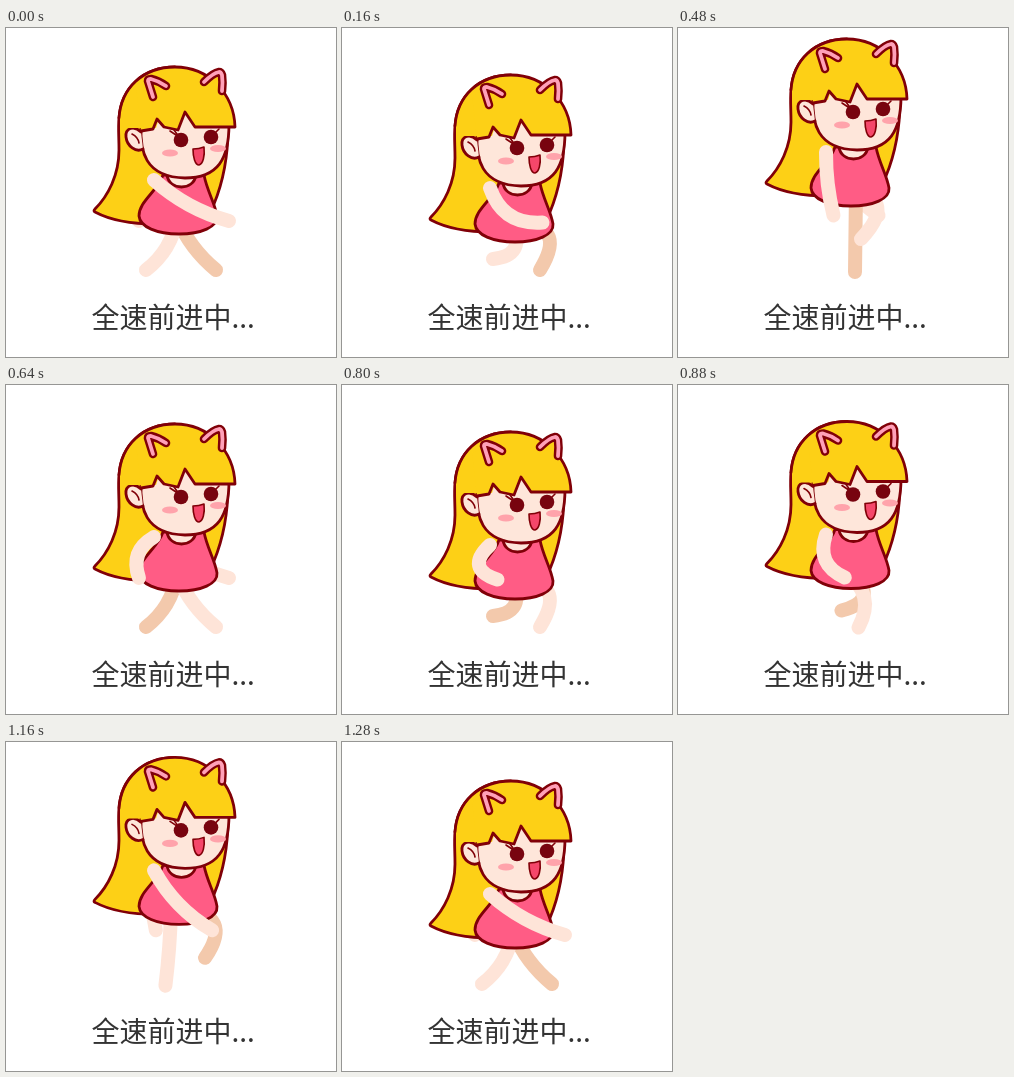
Animation of 330x329 px, one loop 1.4 s. Source, as an HTML page:

```html
<!DOCTYPE html>
<html lang="zh">
<head>
<meta charset="utf-8">
<title>全速前进中</title>
<style>
  html, body { margin: 0; width: 100%; height: 100%; overflow: hidden; background: #fff; }
  svg { display: block; width: 330px; height: 329px; }
  .line { stroke: #800008; stroke-width: 2.8; stroke-linejoin: round; stroke-linecap: round; }
  .open { fill: none; }
  .thin { stroke-width: 1.6; }
  .hair { fill: #fdd016; }
  .skin { fill: #fee6da; }
  .dress { fill: #ff5c85; }
  .mouth { fill: #f5476a; }
  .eye { fill: #78040f; }
  .blush { fill: #ffa3ab; }
  .limb { fill: none; stroke: #fee4d8; stroke-width: 14; stroke-linecap: round; }
  #farLeg { stroke: #f3c9ac; }
  .ear { stroke-linecap: round; stroke-linejoin: round; }
  .rim { fill: #fdd016; stroke: #800008; stroke-width: 8.6; }
  .pink { fill: none; stroke: #ffa0b8; stroke-width: 3.8; }
  text { font: 28px "Noto Sans CJK SC", "Noto Sans CJK", sans-serif; fill: #333; }
</style>
</head>
<body>
<svg viewBox="0 0 330 329">
  <defs>
    <path id="leftEar" d="M147 69L142 53Q142 51 145 51Q153 53 160 58"/>
    <path id="rightEar" d="M198 54Q207 45 213 44Q215 44 216 47Q217 54 216 63"/>
  </defs>
  <path id="farArm" class="limb"/>
  <g class="bob">
    <path class="hair line" d="M89 181C102 168 113 147 113 122C113 109 112 100 113 90C115 60 137 39 169 39L222 100C222 130 217 154 208 176L190 190L150 196C126 196 104 192 89 184Q87 183 89 181Z"/>
  </g>
  <path id="farLeg" class="limb"/>
  <path id="nearLeg" class="limb"/>
  <g class="bob">
    <path class="dress line" d="M157 147C152 163 133 173 133 188C134 199 151 206 173 206C195 206 212 199 211 188C209 175 201 163 198 147Z"/>
    <path class="skin line" d="M161 147C163 163 188 163 190 147Z"/>
  </g>
  <path id="nearArm" class="limb"/>
  <g class="bob">
    <path class="skin line" d="M135 98C134 122 138 149 179 150C212 150 223 131 223 96L200 70L150 74Z"/>
    <path class="skin line" d="M135 104C128 97 119 100 120 109C121 118 130 125 137 121"/>
    <path class="line open thin" d="M126 106Q132 109 133 115"/>
    <path class="hair" d="M114 100L114 90C116 60 138 39 169 39L150 100Z"/>
    <path class="hair" d="M135 103L147 101L151 91L158 99L172 102L179 84L189 99L229 99C228 66 203 39 169 39L130 60Z"/>
    <path class="line open" d="M135 103L147 101L151 91L158 99L172 102L179 84L189 99L229 99C228 66 203 39 169 39C137 39 115 60 113 90"/>
    <use href="#leftEar" class="ear rim"/>
    <use href="#leftEar" class="ear pink"/>
    <use href="#rightEar" class="ear rim"/>
    <use href="#rightEar" class="ear pink"/>
    <ellipse class="blush" cx="164" cy="125" rx="8" ry="3.6"/>
    <ellipse class="blush" cx="212" cy="120.500" rx="8" ry="3.6"/>
    <circle class="eye" cx="175" cy="112" r="7.300"/>
    <circle class="eye" cx="205" cy="109" r="7.300"/>
    <path class="line open thin" d="M170 107L164 103M171 106L168 102M210 104L213 101"/>
    <path class="line mouth thin" d="M187 121Q193 121 198 119C199 128 197 136 193 137C189 137 187 129 187 121Z"/>
  </g>
  <text x="85.500" y="300">全速前进中...</text>
</svg>
<script>
const STEP = 40, WALK = 1280, LOOP = 1400;
const KEYS = 8, KEY = WALK / KEYS;

// Key poses of a walk: contact, down, passing, up, then the same for the other foot.
const lift = [0, 8, -13, -28];
const hipGap = [0, 0, 7, 7];
const elbow = [10, 24, 36, 4, 18, 30, 13, 12];
const knee = [12, 26, 42, 54, -8, 50, 0, 0];
const footX = [140, 151, 169, 190, 210, 198, 170, 170];
const footY = [242, 231, 220, 211, 242, 242, 243, 244];

// Smooth step between neighbouring keys.
function at(keys, time) {
  const i = Math.floor(time / KEY), u = time / KEY - i;
  const a = keys[i % keys.length], b = keys[(i + 1) % keys.length];
  return a + (b - a) * u * u * (3 - 2 * u);
}

// Curve from a to b whose control point sits `bulge` to the right of the middle.
function arc(ax, ay, bx, by, bulge) {
  const dx = bx - ax, dy = by - ay, k = bulge / Math.hypot(dx, dy);
  return `M${ax} ${ay}Q${(ax + bx) / 2 + dy * k} ${(ay + by) / 2 - dx * k} ${bx} ${by}`;
}

// The hand swings evenly back and forth at almost constant height.
function arm(time) {
  const y = at(lift, time);
  const swing = Math.abs((time / WALK) % 1 * 2 - 1);
  return arc(148, 152 + y, 133 + 90 * swing, 193 + y / 5, -at(elbow, time));
}

function leg(time, side) {
  const gap = side * at(hipGap, time);
  return arc(171 + gap, 190 + at(lift, time),
    at(footX, time) + gap, at(footY, time), at(knee, time));
}

const set = (id, d) => document.getElementById(id).setAttribute("d", d);
const body = document.querySelectorAll(".bob");
const start = performance.now();

function draw() {
  const now = (performance.now() - start) % LOOP;
  const time = Math.min(Math.floor(now / STEP) * STEP, WALK);
  const other = time + WALK / 2;
  body.forEach(g => g.setAttribute("transform", `translate(0 ${at(lift, time)})`));
  set("nearArm", arm(time));
  set("farArm", arm(other));
  set("nearLeg", leg(time, -1));
  set("farLeg", leg(other, 1));
  requestAnimationFrame(draw);
}
draw();
</script>
</body>
</html>
```
